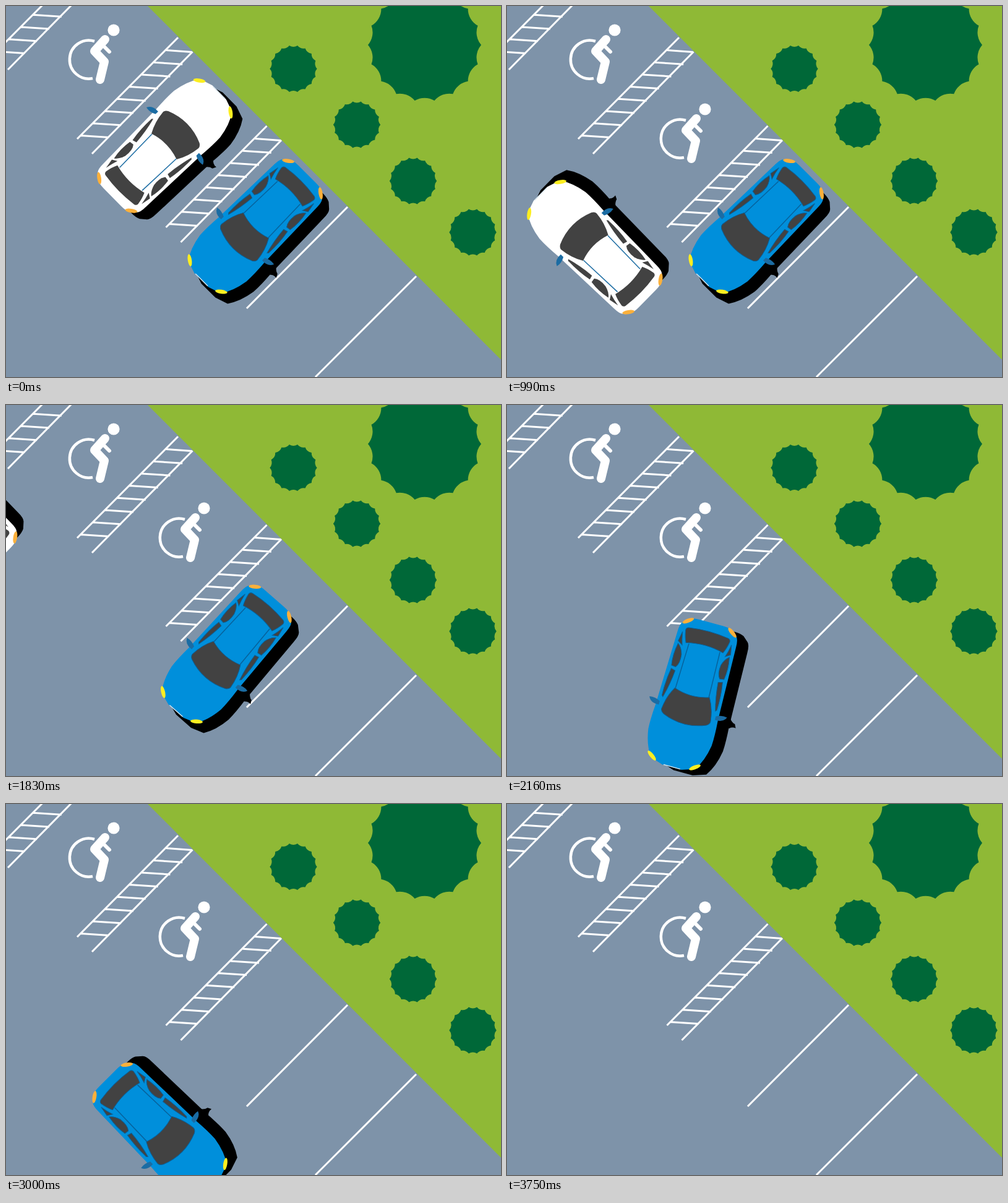
An HTML page for the animation above (4.5 s loop, 800 by 600 pixels).

```html
<!DOCTYPE html>
<html lang="en">
<head>
<meta charset="utf-8">
<title>Car park</title>
<style>
  html, body { margin: 0; width: 100%; height: 100%; overflow: hidden; background: #7e93a9; }
  svg { display: block; width: 800px; height: 600px; }
  .paint { fill: none; stroke: #fff; stroke-width: 3; }
  .glass { fill: #424242; stroke: var(--trim); stroke-width: var(--rim); }
</style>
</head>
<body>
<svg viewBox="0 0 800 600">
  <defs>
    <path id="body" d="M-16-122H16L37-115Q49-98 53-72Q54-55 52-30L49 92Q49 105 45 109L36 117Q30 120 20 120H-20Q-30 120-36 117L-45 109Q-49 105-49 92L-52-30Q-54-55-53-72Q-49-98-37-115Z"/>
    <path id="mirror" d="M47-30Q61-31 65-21Q56-19 47-24Z"/>
    <g id="side">
      <path class="glass" d="M44-16Q38 6 36 30L43 32Q47 10 46-14Z"/>
      <path class="glass" d="M44 37L37 36Q31 43 33 58Q36 69 43 74Q47 55 44 37Z"/>
      <path class="glass" d="M36 73L44 78L41 94Q39 82 36 73Z"/>
      <path d="M28 3L26 78" fill="none" stroke="var(--trim)" stroke-width="1.5"/>
      <ellipse rx="10" ry="3.2" transform="translate(36-112.5)rotate(36)" fill="#fcee21"/>
      <ellipse rx="10" ry="3.2" transform="translate(37 113.5)rotate(-36)" fill="#fbb03b"/>
      <use href="#mirror" fill="#1b6ca3"/>
    </g>
    <g id="car">
      <g transform="translate(20-4)">
        <use href="#body"/>
        <path d="M48-34L53-33Q57-29 63-30L60-24Q54-23 48-14Z"/>
      </g>
      <use href="#body" fill="var(--coat)"/>
      <path d="M-14-121.5H14" stroke="#d5e3ec" stroke-width="1.5"/>
      <path class="glass" d="M-29 3Q-39-14-41-35Q-41-39-36-42Q0-57 36-42Q41-39 41-35Q39-14 29 3Q0-7-29 3Z"/>
      <path class="glass" d="M-31 78Q0 86 31 78Q35 86 37 98Q37 102 33 103Q0 108-33 103Q-37 102-37 98Q-35 86-31 78Z"/>
      <use href="#side"/>
      <use href="#side" transform="scale(-1 1)"/>
    </g>
    <g id="wheelchair" fill="none" stroke="#fff">
      <circle cx="174" cy="39" r="9.6" fill="#fff" stroke="none"/>
      <path d="M143 57A31 31 0 1 0 140 117" stroke-width="4.5"/>
      <path d="M160 54L143 73L159 90L152 119" stroke-width="14" stroke-linecap="round" stroke-linejoin="round"/>
      <path d="M156 63L167 74" stroke-width="6" stroke-linecap="round"/>
    </g>
    <path id="hatch" class="paint"/>
    <path id="tree" fill="#006838"/>
  </defs>

  <path d="M0 0H800V600H0Z" fill="#7e93a9"/>
  <path d="M229 0L800 572V0Z" fill="#8fb936"/>
  <use href="#hatch" x="-136" y="-136"/>
  <use href="#hatch"/>
  <use href="#hatch" x="143.5" y="143"/>
  <path class="paint" d="M552 325L389 489M663 437L500 600"/>
  <use href="#wheelchair"/>
  <use href="#wheelchair" x="146" y="128"/>
  <use href="#tree" transform="translate(676.5 63)"/>
  <use href="#tree" transform="translate(464.5 101.5)scale(.417)"/>
  <use href="#tree" transform="translate(567 192)scale(.417)"/>
  <use href="#tree" transform="translate(658 283)scale(.417)"/>
  <use href="#tree" transform="translate(754.5 366)scale(.417)"/>
  <use id="white" href="#car" style="--coat:#fff;--trim:#1b6ca3;--rim:0"/>
  <use id="blue" href="#car" style="--coat:#008fdb;--trim:#07629c;--rim:1"/>
</svg>
<script>
const LOOP = 4500, STEP = 30;
const el = id => document.getElementById(id);

let rungs = "M278 51L115 215M301.5 74L139 239";
for (let i = 0; i < 8; i++) {
  rungs += `M${259 - 19.8 * i} ${71.5 + 19.7 * i}l${i ? 46 : 42} 3`;
}
el("hatch").setAttribute("d", rungs);

let crown = "M91.5 0";
for (let i = 1; i <= 18; i++) {
  const a = i * Math.PI / 9;
  crown += `A31 31 0 0 0 ${91.5 * Math.cos(a)} ${91.5 * Math.sin(a)}`;
}
el("tree").setAttribute("d", crown + "Z");

// Keys are [ms, x, y, heading]; a repeated key marks a sharp change of direction.
const cars = [
  { node: el("white"), flip: 1, keys: [
    [0, 257.5, 225.2, 45.5], [300, 208, 275, 40], [510, 181.5, 309.5, 19.8],
    [990, 141.2, 389.2, -45.5], [1210, 175, 423, -45.5], [1210, 175, 423, -45.5],
    [1960, -148, 106, -45.5]] },
  { node: el("blue"), flip: -1, keys: [
    [1560, 402, 357, 225], [1860, 350, 409, 220], [2160, 298.5, 468, 195.3],
    [2400, 268, 530, 172], [2400, 268, 530, 172], [2700, 220, 499, 136],
    [2880, 199, 477.5, 135], [2880, 199, 477.5, 135], [3540, 476, 755, 135]] }
];

function slope(keys, i, c) {
  const a = keys[Math.max(i - 1, 0)], b = keys[Math.min(i + 1, keys.length - 1)];
  return (b[c] - a[c]) / (b[0] - a[0]);
}

function pose(keys, t) {
  const last = keys.length - 1;
  if (t <= keys[0][0]) return keys[0].slice(1);
  if (t >= keys[last][0]) return keys[last].slice(1);
  const i = keys.findIndex(k => k[0] > t) - 1;
  const a = keys[i], b = keys[i + 1], span = b[0] - a[0], u = (t - a[0]) / span;
  return [1, 2, 3].map(c => {
    const d = b[c] - a[c], m = slope(keys, i, c) * span, n = slope(keys, i + 1, c) * span;
    return a[c] + u * (m + u * (3 * d - 2 * m - n + u * (m + n - 2 * d)));
  });
}

function draw() {
  const t = Math.floor(performance.now() % LOOP / STEP) * STEP;
  for (const { node, flip, keys } of cars) {
    const [x, y, heading] = pose(keys, t);
    node.setAttribute("transform", `translate(${x} ${y})rotate(${heading})scale(${flip} 1)`);
  }
  requestAnimationFrame(draw);
}
draw();
</script>
</body>
</html>
```
